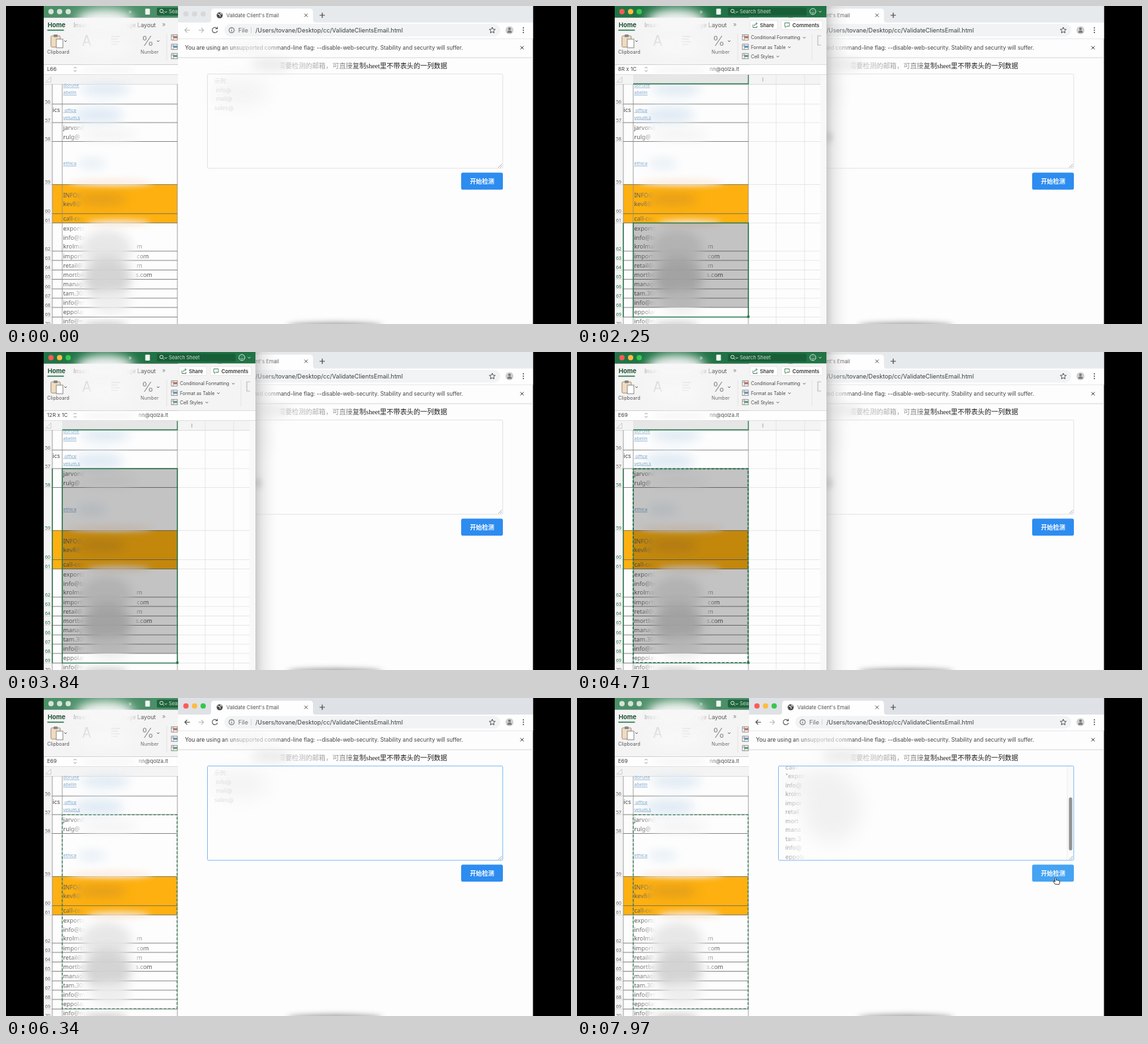
Animation of 854x480 px, one loop 8000 ms. Source, as an HTML page:

```html
<!DOCTYPE html>
<html lang="en">
<head>
<meta charset="utf-8">
<title>Email check</title>
<style>
html, body { margin: 0; width: 100%; height: 100%; overflow: hidden; background: #000; }
svg { display: block; width: 100vw; height: 100vh; }
text { font-family: Inter, "Noto Sans CJK SC", "Noto Sans CJK", sans-serif; white-space: pre; }
.cell { font-family: "Noto Sans", sans-serif; }
.serif { font-family: "Liberation Serif", "Noto Sans CJK SC", "Noto Sans CJK", serif; }
</style>
</head>
<body>
<svg id="stage" viewBox="0 0 854 480"></svg>
<script>
const LOOP = 8000;
const GREEN = '#217346', PAGE = '#fdfdfd', CHROME = '#f4f4f4';
// Top edges of sheet rows 56 to 69, then the bottom of row 69
const edges = [118, 148, 176, 204.5, 269.5, 313.5, 327.5, 370, 384, 398.5, 412.5, 427, 441, 455, 469.5];
const FIRST = 56, LAST = 13;

const rect = (x, y, w, h, fill, more = '') =>
  `<rect x="${x}" y="${y}" width="${w}" height="${h}" fill="${fill}" ${more}/>`;
const text = (x, y, size, str, fill = '#444', more = '') =>
  `<text x="${x}" y="${y}" font-size="${size}" fill="${fill}" ${more}>${str}</text>`;
const line = (d, stroke, w = 1, more = '') =>
  `<path d="${d}" fill="none" stroke="${stroke}" stroke-width="${w}" ${more}/>`;
const dot = (x, y, r, fill, more = '') =>
  `<circle cx="${x}" cy="${y}" r="${r}" fill="${fill}" ${more}/>`;
const smudge = (x, y, rx, ry, fill, op = 1, soft = 'b8') =>
  `<ellipse cx="${x}" cy="${y}" rx="${rx}" ry="${ry}" fill="${fill}" opacity="${op}" filter="url(#${soft})"/>`;
const chevron = (x, y, c = '#555') => line(`M${x - 1.8} ${y - 1}l1.8 2 1.8 -2`, c, 0.9);
const lights = (id, x, y) => `<g id="${id}">` + [0, 13, 26].map(d => dot(x + d, y, 4, '#ccc')).join('') + '</g>';

function defs() {
  const blur = n => `<filter id="b${n}" x="-60%" y="-150%" width="220%" height="400%"><feGaussianBlur stdDeviation="${n}"/></filter>`;
  const fade = (id, x1, x2, stops) =>
    `<linearGradient id="${id}" gradientUnits="userSpaceOnUse" x1="${x1}" x2="${x2}" y1="0" y2="0">` +
    stops.map(([o, c, a]) => `<stop offset="${o}" stop-color="${c}" stop-opacity="${a}"/>`).join('') + '</linearGradient>';
  return '<defs>' + blur(4) + blur(8) + blur(14) +
    fade('hint', 412, 550, [[0, '#999', 0], [0.1, '#aaa', 0.7], [0.75, '#8a8a8a', 1], [0.85, '#444', 1], [1, '#222', 1]]) +
    fade('shade', 377, 412, [[0, '#a8a8a8', 0.6], [0.3, '#cfcfcf', 0.45], [1, '#f0f0f0', 0]]) +
    fade('notice', 270, 420, [[0, '#333', 1], [0.4, '#444', 1], [0.62, '#aaa', 0.7], [0.85, '#999', 0.8], [1, '#444', 1]]) +
    fade('paste', 312, 350, [[0, '#8c8c8c', 1], [1, '#ccc', 0.1]]) +
    fade('head', 88, 120, [[0, '#505050', 1], [0.5, '#707070', 0.8], [1, '#aaa', 0]]) +
    fade('tail', 190, 214, [[0, '#999', 0.3], [1, '#505050', 1]]) +
    fade('tabs', 102, 226, [[0, '#888', 1], [0.2, '#ccc', 0.5], [0.65, '#ccc', 0.3], [0.85, '#555', 1]]) +
    '<clipPath id="all"><rect x="57" y="0" width="739.5" height="480"/></clipPath>' +
    '<clipPath id="sheetClip"><rect id="sheetBox" x="57" y="0" width="203" height="480"/></clipPath>' +
    '<clipPath id="fieldClip"><rect x="305" y="103" width="436" height="141.5"/></clipPath></defs>';
}

function browser() {
  const pasted = ['call-', '"expor', 'info@', 'krolm', 'impor', 'retail', 'mort', 'mana', 'tam.3', 'info@', 'eppola'];
  const sample = ['示例：', ' info@', ' mail@', 'sales@'];
  return '<g>' + rect(260, 0, 537, 480, PAGE) +
    rect(260, 0, 537, 25, '#dee1e6', 'id="strip"') +
    lights('webLights', 272, 12) +
    `<path d="M306 25q4 0 4-4V9q0-5 5-5h144q5 0 5 5v12q0 4 4 4z" fill="#fefefe"/>` +
    dot(323, 14, 4.6, '#4a4a4a') + line('M320 12l3 1 1 3M324 10.5l2 2', '#fff', 1.1) +
    text(333, 16.7, 7.65, "Validate Client's Email", '#505050') +
    line('M451 11.500l5 5m0-5l-5 5', '#505050') + line('M474 14h8m-4-4v8', '#444', 1.2) +
    rect(260, 25, 537, 24, '#fefefe') + rect(330, 27, 417, 19, '#f1f3f4', 'rx="9.5"') +
    '<g id="nav">' + line('M278 36.500h-7.500m3.300-3.500l-3.500 3.500 3.500 3.500', '#505050', 1.2) + '</g>' +
    line('M291 36.500h7.500m-3.300-3.500l3.500 3.500-3.500 3.500', '#bbb', 1.1) +
    line('M319 34a4 4 0 1 0 .6 3.500M319.500 31.500v3h-3', '#5f6368', 1.2) +
    dot(341, 36.5, 4, 'none', 'stroke="#5f6368"') + line('M341 36v2.600M341 33.800v1', '#5f6368') +
    text(351, 39.8, 9, 'File', '#6b6e72') + line('M370.500 32v9', '#ccc', 0.8) +
    text(377, 39.8, 9.05, '/Users/tovane/Desktop/cc/ValidateClientsEmail.html', '#3c4043') +
    line('M735 32l1.300 3 3.200.300-2.400 2.100.700 3.200-2.800-1.700-2.800 1.700.700-3.200-2.400-2.100 3.200-.300z', '#505050') +
    dot(761, 36.5, 6, '#cfcfcf') + dot(761, 34.6, 2, '#777') + '<path d="M757.500 40.500a3.500 3.500 0 0 1 7 0z" fill="#777"/>' +
    [33, 36.5, 40].map(y => dot(782, y, 1, '#505050')).join('') +
    line('M260 49.500h537', '#e4e4e6', 0.8) +
    smudge(365, 62, 36, 7, '#f2f2f2', 0.8) +
    text(270.5, 66, 8.33, 'You are using an unsupported command-line flag: --disable-web-security. Stability and security will suffer.', 'url(#notice)') +
    line('M777.500 60.500l5 5m0-5l-5 5', '#444') + line('M260 78h537', '#d8d8da', 1.2) +
    smudge(400, 88, 30, 8, '#d9d9d9', 0.6) + smudge(355, 130, 42, 20, '#f1f1f1', 0.8, 'b14') +
    text(667, 93.7, 10.2, '需要检测的邮箱，可直接复制sheet里不带表头的一列数据', 'url(#hint)', 'text-anchor="end" class="serif"') +
    '<g id="empty">' + sample.map((s, i) => text(315, 116 + i * 13.5, 8.5, s, '#dedede')).join('') + '</g>' +
    '<g id="pasted">' + smudge(385, 165, 45, 52, '#f0f0f0', 0.9, 'b14') +
    '<g clip-path="url(#fieldClip)">' + pasted.map((s, i) => text(315, 107.5 + i * 13.5, 9, s, 'url(#paste)')).join('') + '</g>' +
    rect(741, 103.5, 9.5, 132, '#fafafa') + line('M741 103v141', '#e6e6e6', 0.7) +
    rect(743.5, 150, 5, 80, '#929292', 'rx="2.5"') + '</g>' +
    rect(304.5, 102.7, 446.3, 142.3, 'none', 'id="field" rx="1.5"') +
    line('M744 244l5.500-5.500M747 244l2.500-2.500', '#999', 0.8) +
    rect(688, 251.5, 63, 25.7, '#2d8cf0', 'id="button" rx="2.5"') +
    text(719.5, 268, 9.2, '开始检测', '#fff', 'text-anchor="middle" font-weight="700"') +
    smudge(497, 483, 72, 5, '#777', 0.8, 'b4') +
    '</g>';
}

function ribbon() {
  const tool = (y, s, end, c) => rect(250, y - 7, 9, 8, '#fff', 'stroke="#777" stroke-width=".8"') +
    rect(253, y - 4.5, 6, 3, c) + line(`M250 ${y - 4.5}h9M253 ${y - 7}v8`, '#777', 0.7) +
    text(263, y, 6.95, s) + chevron(end, y - 2.5);
  const button = (x, w) => rect(x, 22, w, 13.5, '#fff', 'rx="2" stroke="#e0e0e0" stroke-width=".7"');
  return rect(57, 0, 320, 17.5, GREEN, 'id="title"') + lights('sheetLights', 68, 8.5) +
    rect(228, 2.5, 119, 12, '#165a34', 'rx="2" opacity=".8"') +
    dot(235, 7.5, 2.5, 'none', 'stroke="#e8f0ea"') + line('M237 9.500l2 2', '#e8f0ea') + chevron(241.5, 9, '#e8f0ea') +
    text(246, 11.3, 7.4, 'Search Sheet', '#c9dccf') +
    rect(210.5, 4, 7, 9, '#f2f6f3', 'rx="1"') + text(185, 11.5, 9, '»', '#c7dbce') +
    dot(356.5, 8.3, 4.5, 'none', 'stroke="#e8f0ea"') + line('M354.300 9.500q2.200 2.500 4.400 0M355 7h.8M357.500 7h.8', '#e8f0ea', 0.9) +
    chevron(367.5, 8.5, '#e8f0ea') +
    rect(57, 17.5, 320, 71, CHROME) +
    text(63, 32, 9.3, 'Home', '#1d4f30', 'font-weight="700"') + line('M62.500 36.500h25', GREEN, 1.6) +
    text(102, 32, 9, 'Insert', 'url(#tabs)') + text(226.5, 32, 8.8, 'Page Layout', 'url(#tabs)', 'text-anchor="end"') +
    text(236, 31, 9, '»', '#888') +
    button(261.5, 41.5) +
    line('M266 28v4.500h6V30M268 30q0-3.500 4-3.500m-1.500-1.800l2 1.800-2 1.800', '#3b7a55', 0.9) + text(276.5, 31.7, 7.6, 'Share', '#3a3a3a', 'font-weight="600"') +
    button(309, 62) +
    line('M314 25.500h7v5h-4l-2 2v-2h-1z', '#3b7a55', 0.9) + text(325.5, 31.7, 7.8, 'Comments', '#3a3a3a', 'font-weight="600"') +
    rect(68, 45, 14, 17, '#f0dcc0', 'rx="1.5" stroke="#a08a70"') + rect(72, 43, 6, 4, '#888', 'rx="1"') + rect(76, 50, 10, 13, '#fff', 'stroke="#888"') + chevron(90, 53) +
    text(79, 72, 7.3, 'Clipboard', '#5a5a5a', 'text-anchor="middle"') +
    text(122, 60, 21, 'A', '#d2d2d2', 'text-anchor="middle"') +
    line('M159 46h13M159 50h10M159 54h13M159 58h10', '#dcdcdc', 1.3) +
    text(214, 60, 20, '%', '#8a8a8a', 'text-anchor="middle" font-weight="300"') + chevron(230, 53) +
    text(217, 72, 7.3, 'Number', '#707070', 'text-anchor="middle"') +
    line('M243 42v40', '#e0e0e0', 0.8) +
    tool(50.3, 'Conditional Formatting', 343.5, '#cf6a52') + tool(64.7, 'Format as Table', 321, '#5c9ac5') + tool(78.7, 'Cell Styles', 303.5, '#5ca578') +
    line('M355 42v40', '#e0e0e0', 0.8) + line('M369 45h-5v14h5', '#bbb', 1.2) +
    smudge(150, 22, 44, 18, '#f8f8f8', 0.97) + smudge(150, 62, 42, 16, '#fafafa', 0.6) +
    rect(57, 88.5, 320, 15.5, '#fefefe') + line('M57 88.500h320M57 103.500h320', '#d6d6d6', 0.8) +
    text(62, 98.3, 8, 'L66', '#444', 'id="ref"') +
    line('M102.500 94l2-2 2 2M102.500 97l2 2 2-2', '#888', 0.9) +
    text(245, 97.8, 8, 'nn@qolza.lt', 'url(#tail)', 'id="formula" text-anchor="end"') +
    smudge(155, 96, 42, 5, '#f4f4f4', 0.8, 'b4');
}

function grid() {
  const words = [
    [187, 'jarvon@'], [201, 'rulg@'], [289, 'INFO@'], [302, 'kev8@'], [324, 'call-cen'], [339, 'export@'], [352.5, 'info@be'],
    [366, 'krolma@', 'm'], [380.5, 'import@', 'com', 216], [395, 'retail@', 'm'], [409, 'mortbe', 's.com', 221],
    [423, 'manage'], [437, 'tam.30@'], [451, 'info@me'], [465, 'eppolan@'], [479, 'info@me']];
  const links = [[122, 'dorune'], [133, 'abelin'], [159.5, ' office'], [170.5, 'velum.s'], [240, 'ethica']];
  const cell = 'class="cell"';
  return rect(57, 104, 320, 376, PAGE) +
    rect(57, 104, 320, 14, CHROME) + rect(57, 118, 13, 362, CHROME) +
    rect(70, 269.5, 189, 58, '#fdb010') +
    text(280, 114, 7, 'I', '#777') + line('M57 118.300h320', '#ccc', 0.7) + line('M60 115l8-8v8z', '#ccc') +
    edges.slice(1).map(y => line(`M70 ${y}h189`, '#666', 0.8) + line(`M57 ${y}h13`, '#ccc', 0.6) +
      line(`M259 ${y}h109`, '#e2e2e6', 0.8)).join('') +
    line('M301 104v376M344 104v376', '#e2e2e6', 0.8) +
    line('M70 118v362M85 118v362M259 118v362', '#888', 0.8) +
    rect(368, 104, 9, 376, '#f8f8f8') +
    smudge(150, 126, 38, 9, '#dbe7f2', 0.95) + smudge(140, 165, 38, 13, '#dfeaf4', 0.95) +
    smudge(155, 194, 44, 10, '#f4f4f4', 0.95) + smudge(130, 238, 22, 6, '#dce8f3', 0.9) +
    smudge(158, 266, 64, 6, '#fbeee2', 0.95, 'b4') + smudge(145, 292, 38, 8, '#dd9a1c', 0.85) +
    smudge(170, 327, 48, 5, '#f7e6d4', 0.95, 'b4') +
    smudge(152, 366, 38, 28, '#e6e6e6', 0.95) + smudge(153, 410, 36, 32, '#d2d2d2', 0.95) + smudge(158, 447, 30, 18, '#ededed', 0.9) +
    smudge(150, 480, 34, 4, '#c4c4c4', 0.8, 'b4') +
    text(70.5, 159.5, 9, 'ics', '#444', cell) +
    links.map(([y, s]) => text(86.5, y, 7, s, '#7fa6cc', cell + ' text-decoration="underline"')).join('') +
    words.map(([y, s, tail, x = 206]) => text(86.5, y, 9, s, 'url(#head)', cell) +
      (tail ? text(x, y, 9, tail, 'url(#tail)', cell + ' text-anchor="end"') : '')).join('') +
    `<g id="pick">` + rect(85, 104, 174, 14, '#e6e6e6') + line('M85 117.500h174', GREEN, 1.6) + line('M259 104v14', GREEN, 1.3) +
    rect(85, 0, 174, 0, '#000', 'id="tint" opacity=".23"') +
    line('', GREEN, 1.4, 'id="sideBar"') + rect(85, 0, 174, 0, 'none', `id="frame" stroke="${GREEN}" stroke-width="1.4"`) +
    rect(257.3, 467.3, 3.4, 3.4, GREEN) + '</g>' +
    rect(85, 176.3, 173.5, 292.7, 'none', `id="ants" stroke="${GREEN}" stroke-dasharray="4 2.5"`) +
    edges.slice(1).map((y, i) => text(67, y - 1.5, 7, FIRST + i, '#666', 'class="cell num" text-anchor="end"')).join('') +
    text(67, 482, 7, 70, '#666', 'class="cell" text-anchor="end"');
}

const stage = document.getElementById('stage');
stage.innerHTML = defs() + '<g clip-path="url(#all)">' + browser() +
  '<g id="shadow">' + rect(377, 0, 35, 480, 'url(#shade)') + smudge(380, 198, 6, 8, '#aaa', 0.5, 'b4') + '</g>' +
  '<g clip-path="url(#sheetClip)">' + grid() + ribbon() + '</g>' +
  '<g id="hand"><path d="M-2.500 5L-5 1.500q-.500-1.500 1-1.300L-2.500 1.500V-4q1-1.600 2 0V-.800q1-.800 1.700.200 1.100-.700 1.700.300 1.500-.500 1.700 1V3L3.600 5.500z" fill="#fff" stroke="#2a2a2a" stroke-width=".9" stroke-linejoin="round"/></g></g>';

const $ = id => document.getElementById(id);
const set = (id, attrs) => { for (const k in attrs) $(id).setAttribute(k, attrs[k]); };
const show = (id, on) => set(id, { display: on ? 'inline' : 'none' });
const nums = [...document.querySelectorAll('.num')];
const paintLights = (id, on, off) => [...$(id).children].forEach((c, i) =>
  c.setAttribute('fill', on ? ['#fc5b57', '#fdbc40', '#34c84a'][i] : off));
const ease = (t, from, to) => {
  const k = Math.min(1, Math.max(0, (t - from) / (to - from)));
  return k * k * (3 - 2 * k);
};

// One click brings each window forward and picks the cell or field under it
const CLICK = 650, DRAG = 1350, DRAG_END = 3400, RELEASE = 4250, COPY = 4650;
const FOCUS = 5700, PASTE = 6800, HOVER = 7400;

// Row under the pointer while it drags upward
function topRow(t) {
  const y = 462 - 272 * ease(t, DRAG, DRAG_END);
  return edges.filter(e => e <= y).length - 1;
}

function update(t) {
  const web = t >= FOCUS, clicked = t >= CLICK;
  const sheet = clicked && !web;

  set('sheetBox', { width: sheet ? 320 : 203 });
  show('shadow', sheet);
  set('title', { fill: sheet ? GREEN : '#4b8f68' });
  set('strip', { fill: web ? '#dee1e6' : '#e7eaed' });
  set('nav', { opacity: web ? 1 : 0.4 });
  paintLights('sheetLights', sheet, '#d6e2da');
  paintLights('webLights', web, '#d8d8da');

  const first = topRow(t), top = edges[first], rows = LAST - first + 1;
  const dragging = rows > 1 && t < RELEASE;
  const copied = t >= COPY;
  $('ref').textContent = !clicked ? 'L66' : dragging ? rows + 'R x 1C' : 'E69';
  show('formula', clicked);
  show('pick', sheet);
  set('tint', { y: top, height: edges[LAST] - top });
  set('frame', { y: top, height: edges[LAST + 1] - top, 'stroke-opacity': copied ? 0.35 : 1 });
  set('sideBar', { d: `M70 ${top}V469.500` });
  nums.forEach((el, i) => el.setAttribute('fill', sheet && i >= first ? GREEN : '#666'));
  show('ants', copied);
  set('ants', { 'stroke-width': web ? 1.1 : 1.7, 'stroke-dashoffset': -(t - COPY) * 0.02 });

  const filled = t >= PASTE, hover = t >= HOVER;
  set('field', { stroke: web ? '#7fb8f2' : '#dfe1e6' });
  show('pasted', filled);
  show('empty', !filled);
  set('button', { fill: hover ? '#45a3f3' : '#2d8cf0' });
  show('hand', hover);
  const k = ease(t, HOVER - 300, HOVER + 300);
  set('hand', { transform: `translate(${691 + 34 * k} ${244 + 32 * k})` });
}

const start = performance.now();
function tick() {
  update((performance.now() - start) % LOOP);
  requestAnimationFrame(tick);
}
tick();
</script>
</body>
</html>
```
